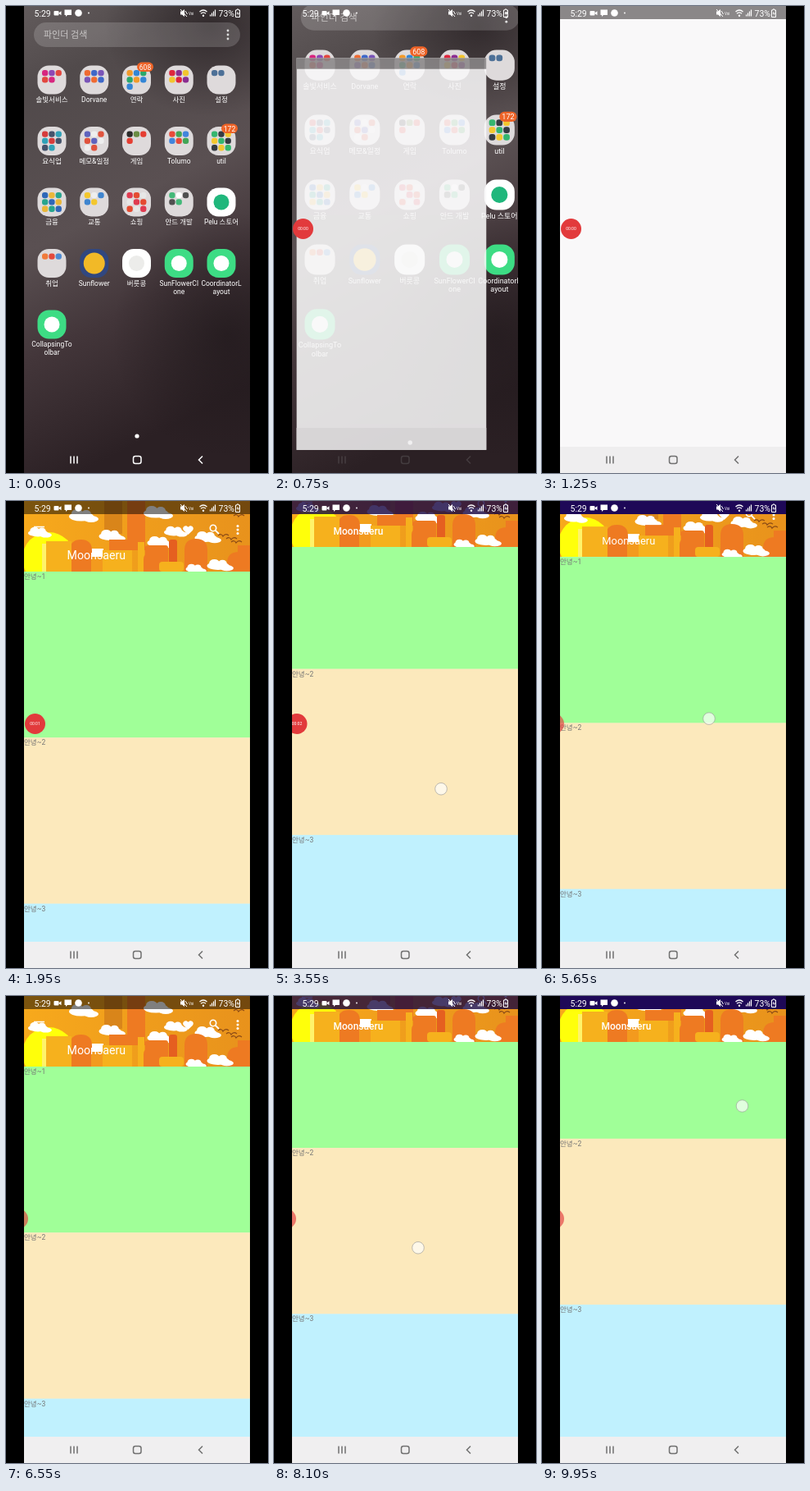
Animation of 320x569 px, one loop 10000 ms. Source, as an HTML page:

```html
<!DOCTYPE html>
<html lang="ko">
<head>
<meta charset="utf-8">
<title>Collapsing toolbar</title>
<style>
  html, body { margin: 0; width: 100%; height: 100%; overflow: hidden; background: #000; }
  svg { display: block; width: 100vw; height: 100vh; }
  text { font-family: Roboto, "Noto Sans CJK KR", "Noto Sans CJK", sans-serif; }
  .label { font-size: 8.5px; fill: #fff; text-anchor: middle; }
  .card { font-size: 8.5px; fill: #757575; }
</style>
</head>
<body>
<svg viewBox="0 0 320 569">
  <defs>
    <clipPath id="screen"><rect x="22" width="276" height="569"/></clipPath>
    <clipPath id="content"><rect x="22" width="276" height="537"/></clipPath>
    <clipPath id="bar"><rect id="barClip" x="22" width="276" height="86"/></clipPath>
    <linearGradient id="wall" x2="0.25" y2="1">
      <stop offset="0" stop-color="#625b5c"/><stop offset=".18" stop-color="#514a4b"/>
      <stop offset=".5" stop-color="#5a5052"/><stop offset=".72" stop-color="#43363a"/>
      <stop offset="1" stop-color="#2b2024"/>
    </linearGradient>
    <radialGradient id="shade"><stop offset="0" stop-color="#1c1518" stop-opacity=".6"/><stop offset="1" stop-color="#1c1518" stop-opacity="0"/></radialGradient>
    <linearGradient id="sky" x2="1" y2="0"><stop offset="0" stop-color="#f7a91c"/><stop offset="1" stop-color="#e8921c"/></linearGradient>
  </defs>
  <rect width="320" height="569"/>
  <g clip-path="url(#screen)">
    <rect x="22" width="276" height="569" fill="url(#wall)"/>
    <ellipse cx="250" cy="25" rx="130" ry="110" fill="url(#shade)"/>
    <ellipse cx="270" cy="400" rx="140" ry="150" fill="url(#shade)"/>
    <g id="home">
      <rect x="34" y="20" width="252" height="30" rx="15" fill="#fff" fill-opacity=".17"/>
      <text x="46" y="39" font-size="11" fill="#c9c6c6">파인더 검색</text>
      <g fill="#ddd"><circle cx="271" cy="30" r="1.4"/><circle cx="271" cy="35" r="1.4"/><circle cx="271" cy="40" r="1.4"/></g>
      <g id="icons"></g>
      <circle cx="160" cy="524" r="2.6" fill="#fff"/>
    </g>
    <g id="splash">
      <rect x="22" width="276" height="569" fill="#f9f8f9"/>
      <rect x="22" width="276" height="16" fill="#8a8788"/>
      <rect x="22" y="537" width="276" height="32" fill="#efeeef"/>
    </g>
    <g id="app">
      <rect x="22" width="276" height="537" fill="#fafafa"/>
      <g id="cards" clip-path="url(#content)"><g id="list"></g></g>
      <g clip-path="url(#bar)">
        <g id="skyline"></g>
        <g id="tools" fill="#fff" stroke="none">
          <path d="M34 31.5h13M34 35.5h13M34 39.5h13" stroke="#fff" stroke-width="1.6"/>
          <path d="M222.500 41l-5-4.800c-4-4 2-8.500 5-4.400c3-4.100 9 .4 5 4.400z"/>
          <circle cx="253" cy="33" r="3.700" fill="none" stroke="#fff" stroke-width="1.6"/>
          <path d="M255.800 35.800l4.200 4.200" stroke="#fff" stroke-width="1.8"/>
          <circle cx="283" cy="30.500" r="1.500"/><circle cx="283" cy="35" r="1.500"/><circle cx="283" cy="39.500" r="1.500"/>
        </g>
        <text id="title" fill="#fff">Moonsaeru</text>
      </g>
      <rect x="22" width="276" height="16" fill="#000" fill-opacity=".5"/>
      <rect id="scrim" x="22" width="276" height="16" fill="#1e0857"/>
      <rect x="22" y="537" width="276" height="32" fill="#f0eff0"/>
    </g>
    <g id="nav" fill="none" stroke-width="1.5">
      <path d="M79 548.500v9M83 548.500v9M87 548.500v9M240 548.500l-4.500 4.500l4.500 4.500"/>
      <rect x="155.500" y="548.500" width="9.500" height="9" rx="2.500"/>
    </g>
    <g id="status" fill="#fff" font-size="10.500">
      <text x="34.500" y="12.500">5:29</text>
      <rect x="58.500" y="6" width="6" height="5.500" rx="1"/><path d="M64 8.700l3.500-2.500v5z"/>
      <path d="M71.500 4.500h8.500v6.500h-5l-2 2v-2h-1.500z"/><circle cx="88.500" cy="8.500" r="4.300"/><circle cx="101" cy="8.500" r=".9"/>
      <path d="M213 6.500h2l3-2.500v9l-3-2.500h-2z"/><path d="M213 4l8 9M219 6l2.500 4" stroke="#fff" fill="none"/>
      <text x="223" y="11" font-size="4.500">Voi</text>
      <path d="M236.500 7q4.500-4 9 0M238 9.300q3-2.800 6 0" fill="none" stroke="#fff" stroke-width="1.200"/><circle cx="241" cy="11.800" r="1.200"/>
      <path d="M249.500 12.500v-2M251.500 12.500v-4M253.500 12.500v-6M255.500 12.500v-8" stroke="#fff" stroke-width="1.200"/>
      <text x="259.500" y="12.500">73%</text>
      <path d="M281 5h1v-1h2v1h1.500v8.500h-5v-8.500z" fill="none" stroke="#fff"/><path d="M283.500 6l-2 3.500h2l-.7 3l2.200-4h-2z"/>
    </g>
    <g id="timer">
      <circle r="12.500" fill="#e23a3c"/>
      <text id="clock" y="1.800" font-size="5" fill="#fff" text-anchor="middle"></text>
    </g>
    <circle id="touch" r="7.300" fill="#fff" fill-opacity=".68" stroke="#999" stroke-opacity=".8" stroke-width=".8"/>
  </g>
</svg>
<script>
const $ = id => document.getElementById(id);
const set = (id, attrs) => { for (const k in attrs) $(id).setAttribute(k, attrs[k]); };
const clamp = v => Math.max(0, Math.min(1, v));
const rect = (x, y, w, h, fill, rx = 0) => `<rect x="${x}" y="${y}" width="${w}" height="${h}" rx="${rx}" fill="${fill}"/>`;
const circle = (x, y, r, fill) => `<circle cx="${x}" cy="${y}" r="${r}" fill="${fill}"/>`;

// Home screen: a number is a folder with that many mini icons.
const apps = [
  ['솔빛서비스', 5], ['Dorvane', 6], ['연락', 7], ['사진', 6], ['설정', 2],
  ['요식업', 8], ['메모&amp;일정', 8], ['게임', 4], ['Tolumo', 6], ['util', 9],
  ['금융', 9], ['교통', 5], ['쇼핑', 9], ['안드 개발', 5], ['Pelu 스토어', 'store'],
  ['취업', 3], ['Sunflower', 'flower'], ['버릇콩', 'plain'], ['SunFlowerCl|one', 'green'], ['CoordinatorL|ayout', 'green'],
  ['CollapsingTo|olbar', 'green']
];
const tile = {
  store: ['#fff', '#20b77c'], flower: ['#31477f', '#f2b927'],
  plain: ['#fff', '#ececea'], green: ['#3ddc84', '#fff']
};
const themes = [
  ['#d7267f', '#e2473f', '#8d47b5'], ['#ef6b32', '#7a55b8', '#3f68c9'], ['#f29b2c', '#2ba86b', '#3486d6'],
  ['#df263d', '#f2c52e', '#8b2d91'], ['#4d7097', '#3d7edb'], ['#d63c3c', '#31a2b8', '#45536b'],
  ['#5f63bd', '#e0533d', '#eee'], ['#2b2b2b', '#e53e32', '#698c43'], ['#e84a3a', '#4285dc', '#43a657'],
  ['#34b66f', '#f3c72e', '#353b42'], ['#2f67b8', '#27a58e', '#e9b73a'], ['#f3c72e', '#3f85cf', '#eee'],
  ['#e03b50', '#e7e7e7', '#e54b31'], ['#44b979', '#505050', '#fff'], [], ['#f07b3c', '#4d8ad1', '#e2493d']
];

function drawApp([name, kind], i) {
  const x = 56 + (i % 5) * 51.75, y = 90 + Math.floor(i / 5) * 74.5;
  let out = '';
  if (typeof kind === 'number') {
    out += rect(x - 17.5, y - 17.5, 35, 35, '#dedadb', 14);
    const colors = themes[i];
    for (let n = 0; n < kind; n++)
      out += rect(x - 12 + (n % 3) * 8.3, y - 12 + Math.floor(n / 3) * 8.3, 7.3, 7.3, colors[(n * 2 + (n / 3 | 0)) % colors.length], 3);
  } else {
    const [back, front] = tile[kind];
    out += rect(x - 17.5, y - 17.5, 35, 35, back, 14);
    out += circle(x, y, kind === 'flower' ? 13 : 9.5, front);
  }
  name.split('|').forEach((line, n) => out += `<text class="label" x="${x}" y="${y + 27 + n * 10}">${line}</text>`);
  return out;
}
const badge = (x, y, count) => rect(x - 10, y - 6, 20, 11.5, '#ee6428', 5.7) +
  `<text class="label" x="${x}" y="${y + 3}">${count}</text>`;
$('icons').innerHTML = apps.map(drawApp).join('') + badge(170, 74.5, 608) + badge(273, 149.5, 172);

const cloud = (x, y, s) => `<g fill="#fff" transform="translate(${x} ${y}) scale(${s})">
  <ellipse rx="15" ry="5.500"/><ellipse cx="-5" cy="-4" rx="7" ry="5"/><ellipse cx="6" cy="-3" rx="6" ry="5"/><ellipse cx="12" cy="3" rx="9" ry="4"/></g>`;
const bird = (x, y) => `<path d="M${x - 6} ${y - 1}q4-3 6 1q3-4 7-1" fill="none" stroke="#8a4a16" stroke-width="1.200"/>`;
const dome = (x, y, w, fill) => `<path d="M${x} 86V${y + w * .5}Q${x} ${y} ${x + w * .5} ${y}T${x + w} ${y + w * .5}V86z" fill="${fill}"/>`;
const deep = '#ee7a22', amber = '#f6b11d', red = '#e55f20';
$('skyline').innerHTML = rect(22, 0, 276, 86, 'url(#sky)') +
  circle(52, 70, 32, '#ffff0a') +
  rect(120, 0, 22, 40, '#d9851a') + rect(148, 0, 22, 60, deep) +
  cloud(92, 19, 1) + cloud(39, 39, .8) + cloud(183, 15, 1) + cloud(127, 43, .9) + cloud(186, 51, .9) + cloud(244, 45, .9) + cloud(205, 38, .8) +
  rect(101, 58, 18, 28, '#fff') +
  dome(78, 47, 27, deep) + rect(49, 49, 31, 37, amber) + rect(44, 52, 5, 34, '#fff36a') +
  rect(126, 47, 22, 39, deep) + rect(118, 60, 36, 26, amber) + rect(104, 68, 14, 18, '#f39a1e') +
  rect(161, 50, 8, 36, amber) + dome(168, 64, 14, deep) + rect(170, 54, 28, 32, deep, 3) +
  dome(218, 46, 28, deep) + rect(199, 47, 10, 39, red, 3) +
  rect(187, 74, 30, 12, amber, 4) + dome(270, 62, 28, deep) + rect(283, 54, 15, 32, deep) +
  cloud(259, 79, .9) + cloud(230, 83, .7) +
  bird(275, 47) + bird(284, 19) + bird(265, 43) + bird(281, 51);

const cardHeight = 202.3;
$('list').innerHTML = ['#a0ff98', '#fce9bc', '#c0f1fe'].map((fill, n) =>
  rect(22, 86 + n * cardHeight, 276, cardHeight + .3, fill) +
  `<text class="card" x="22" y="${95 + n * cardHeight}">안녕~${n + 1}</text>`).join('');

function track(t, keys) {
  if (t <= keys[0][0]) return keys[0][1];
  for (let i = 1; i < keys.length; i++) {
    const [a, from] = keys[i - 1], [b, to] = keys[i];
    if (t < b) return from + (to - from) * (t - a) / (b - a);
  }
  return keys[keys.length - 1][1];
}

const scrollKeys = [[2150, 0], [2550, 70], [3000, 0], [3180, 0], [3550, 83.5], [3690, 114.5],
  [4900, 114.5], [5650, 18], [5800, 0], [7760, 0], [8100, 103], [8150, 114.5]];
const scrimKeys = [[2200, 0], [2600, .65], [3000, 0], [3180, 0], [3780, 1], [5900, 1], [6500, 0], [7760, 0], [8360, 1]];
// Each gesture holds its x keys and y keys.
const gestures = [
  [[[2150, 204], [3000, 204]], [[2150, 521], [2550, 445], [3000, 521]]],
  [[[3150, 204], [3550, 204], [4200, 228]], [[3150, 440], [3550, 351], [4150, 203], [4200, 203]]],
  [[[4850, 204], [5850, 204]], [[4850, 162], [5650, 265], [5850, 288]]],
  [[[7750, 174], [8100, 176], [8650, 190]], [[7750, 416], [8100, 307], [8550, 205], [8650, 205]]],
  [[[9900, 244.5], [10000, 244.5]], [[9900, 134], [10000, 134]]]
];

function drawLaunch(t) {
  const u = clamp((t - 500) / 550), scale = 1 - (1 - u) ** 3;
  const zoom = (x, y, s) => `translate(${x} ${y}) scale(${s}) translate(${-x} ${-y})`;
  set('home', { transform: zoom(56, 390, 1 + .071 * scale), visibility: u < 1 ? 'visible' : 'hidden' });
  set('splash', { transform: zoom(57, 394, scale), opacity: clamp(u * 1.92) });
  const gray = Math.round(track(t, [[500, 255], [750, 125], [1250, 112]]));
  set('nav', { stroke: `rgb(${gray},${gray},${gray})`, opacity: track(t, [[500, 1], [700, .3], [850, .3], [1200, 1]]) });
}

function drawApplication(t) {
  const scroll = track(t, scrollKeys), lift = Math.min(scroll, 30), f = lift / 30;
  set('app', { opacity: clamp((t - 1640) / 200) });
  set('list', { transform: `translate(0 ${-scroll})` });
  set('barClip', { height: 86 - lift });
  set('skyline', { transform: `translate(0 ${-lift})` });
  set('tools', { transform: `translate(0 ${-lift})` });
  set('title', { x: 74.5 - 2 * f, y: 71 - 30.5 * f, 'font-size': 14.2 - 2.2 * f, 'font-weight': f < 1 ? 400 : 500 });
  set('scrim', { opacity: track(t, scrimKeys) });
}

function drawOverlay(t) {
  const x = track(t, [[2150, 35.5], [2500, 28], [4170, 28], [4250, 14.5]]);
  const opacity = track(t, [[100, 0], [250, 1], [4170, 1], [4250, .65]]);
  set('timer', { transform: `translate(${x} 271.500)`, opacity });
  $('clock').textContent = '00:0' + Math.min(3, Math.max(0, Math.floor((t - 650) / 1000)));
  const active = gestures.find(([xs]) => t >= xs[0][0] && t < xs[xs.length - 1][0]);
  set('touch', { visibility: active ? 'visible' : 'hidden' });
  if (active) set('touch', { cx: track(t, active[0]), cy: track(t, active[1]) });
}

function render(t) {
  drawLaunch(t);
  drawApplication(t);
  drawOverlay(t);
}

const start = performance.now();
function tick() {
  render((performance.now() - start) % 10000);
  requestAnimationFrame(tick);
}
render(0);
requestAnimationFrame(tick);
</script>
</body>
</html>
```
